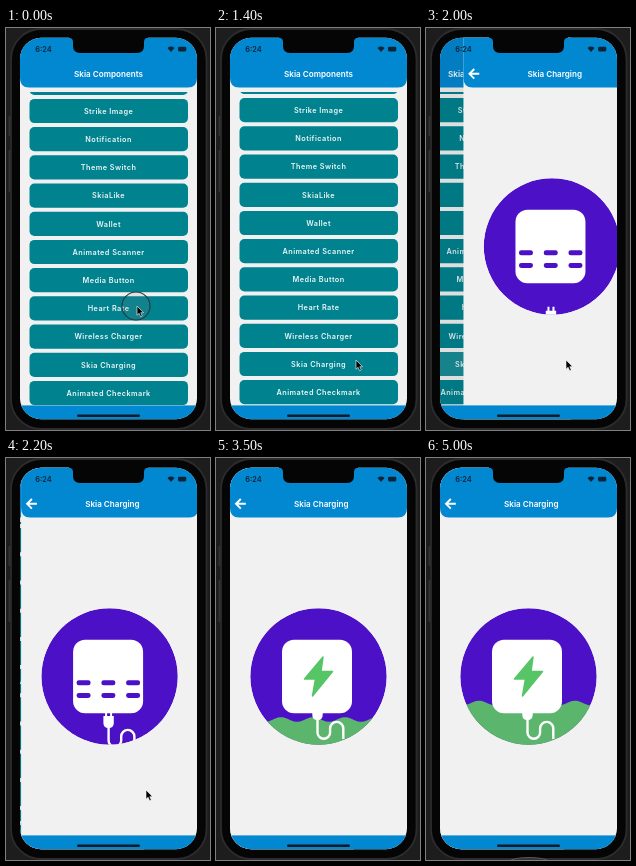
Write an HTML page that moves like this. It is 204 by 402 pixels and loops after 5100 ms.

```html
<!DOCTYPE html>
<html lang="en">
<head>
<meta charset="utf-8">
<title>Charging demo</title>
<style>
  html, body { margin: 0; width: 100%; height: 100%; overflow: hidden; background: #1d1d1e; }
  svg { display: block; width: 204px; height: 402px; }
  text { font-family: Inter, "Open Sans", sans-serif; font-weight: 600; text-anchor: middle; fill: #fff; }
  .title { font-size: 8.1px; }
  .item text { font-size: 7.3px; letter-spacing: .45px; fill: #eef6f6; }
  .item rect { fill: #00838f; }
  .blue { fill: #0288d1; }
  .page { fill: #f1f1f1; }
  .purple { fill: #4c10c6; }
</style>
</head>
<body>
<svg viewBox="0 0 204 402">
  <defs>
    <clipPath id="screen"><rect x="14" y="9.8" width="177" height="381.4" rx="21"/></clipPath>
    <clipPath id="body"><rect x="14" y="64" width="177" height="313.5"/></clipPath>
    <clipPath id="disc"><circle cx="102.5" cy="218.5" r="68.2"/></clipPath>
    <path id="bar" class="blue" d="M14 0H191V50Q191 59.5 182 59.5H23Q14 59.5 14 50Z"/>
  </defs>

  <!-- phone body -->
  <rect x="2.5" y="88" width="3" height="20" rx="1" fill="#333"/>
  <rect x="2.5" y="122" width="3" height="42" rx="1" fill="#333"/>
  <rect x="5" y="1" width="195.5" height="400" rx="30" fill="#050505" stroke="#2c2c2e" stroke-width="1.8"/>

  <g clip-path="url(#screen)">
    <g id="listPage">
      <rect class="page" x="14" width="177" height="402"/>
      <g clip-path="url(#body)"><g id="list"></g></g>
      <use href="#bar"/>
      <text class="title" x="102.5" y="48.8">Skia Components</text>
    </g>
    <rect id="dim" width="204" height="402"/>

    <g id="chargePage">
      <rect class="page" x="14" width="177" height="402"/>
      <use href="#bar"/>
      <path d="M29.8 45.8H20.3M24.8 41L20 45.8L24.8 50.6" fill="none" stroke="#fff" stroke-width="1.9"/>
      <text class="title" x="105.3" y="48.8">Skia Charging</text>
      <g clip-path="url(#disc)">
        <circle class="purple" cx="102.5" cy="218.5" r="68.2"/>
        <path id="wave" fill="#5cb56d"/>
        <g id="cable" fill="#fff">
          <path d="M98 246h2v5h-2zM103 246h2v5h-2zM96.3 250H106.7V257Q106.7 262 101.5 262Q96.3 262 96.3 257Z"/>
          <path d="M101.5 260V274.5a6.3 6.3 0 0 0 12.6 0V270.5a6.6 6.6 0 0 1 13.2 0V281"
                fill="none" stroke="#fff" stroke-width="2.4"/>
        </g>
        <rect x="66" y="181.7" width="70" height="73.5" rx="12" fill="#fff"/>
        <g id="dashes" class="purple"></g>
        <path id="bolt" d="M107 199L88.5 221H99.5L96.5 238L116.5 213.5H105Z"
              fill="#55c566" stroke="#55c566" stroke-width="1.5" stroke-linejoin="round"/>
      </g>
    </g>
    <rect class="blue" x="14" y="377.4" width="177" height="20"/>
  </g>

  <!-- status bar, notch, home indicator -->
  <path d="M63 8V9.8Q67 10 67 14V18Q67 25 74 25H131Q138 25 138 18V14Q138 10 142 9.8V8Z" fill="#050505"/>
  <text x="37.5" y="24.3" font-size="7.4" style="fill:#0b2436">6:24</text>
  <path d="M161.5 20Q165 17.2 168.5 20L165 24Z" fill="#0b2436"/>
  <rect x="172" y="18.8" width="8.3" height="4.6" rx="1.3" fill="#0b2436"/>
  <rect x="71" y="386.5" width="63" height="2.4" rx="1.2" fill="#0a1a26"/>

  <ellipse id="dock" cx="103" cy="404" rx="20" ry="4.5" fill="#333" stroke="#555"/>
  <circle id="touch" r="14" fill="#8882" stroke="#263c40" stroke-width="1.2"/>
  <path id="cursor" d="M0 0V9.2L2.1 7.3L3.7 10.8L5.3 10L3.8 6.7H6.6Z" fill="#000" stroke="#fff" stroke-width=".6"/>
</svg>

<script>
const $ = id => document.getElementById(id);
const clamp = x => Math.max(0, Math.min(1, x));
const ramp = (t, a, b) => clamp((t - a) / (b - a));
const shift = (id, x, y) => $(id).setAttribute('transform', `translate(${x} ${y})`);
const show = (id, on) => $(id).style.opacity = +on;

const LOOP = 5100, STEP = 100, WIDTH = 177;
const items = ['', 'Strike Image', 'Notification', 'Theme Switch', 'SkiaLike', 'Wallet', 'Animated Scanner',
  'Media Button', 'Heart Rate', 'Wireless Charger', 'Skia Charging', 'Animated Checkmark'];

$('list').innerHTML = items.map((name, i) => {
  const y = 54.1 + 28.2 * i;
  return `<g class="item"><rect x="23.5" y="${y - 12.2}" width="158.5" height="24.2" rx="5"/>
    <text x="102.6" y="${y + 2.7}">${name}</text></g>`;
}).join('');
const pressed = $('list').children[10];

$('dashes').innerHTML = [222.2, 234.9].map(y => [69.5, 94.3, 119].map(x =>
  `<rect x="${x}" y="${y}" width="14" height="5" rx="2.3"/>`).join('')).join('');

// time, x, y of the pointer tip
const track = [[0, 131, 278], [600, 131, 278], [1300, 140, 332], [2300, 140, 332], [2600, 181, 302], [2900, 187, 318]];

function pointer(t) {
  const i = track.findIndex(p => p[0] > t);
  const [a, b] = [track[i - 1], track[i]];
  const k = ramp(t, a[0], b[0]), e = k * k * (3 - 2 * k);
  return [a[1] + (b[1] - a[1]) * e, a[2] + (b[2] - a[2]) * e];
}

// fraction of the push still to go, as a critically damped spring
function pushLeft(t) {
  const s = Math.max(0, t - 1807) / 1000 * 18.3;
  return (1 + s) * Math.exp(-s);
}

function drawWave(t) {
  const level = 261.5 - (t - 3500) * 0.0236;
  const crest = 65 + (t - 3500) * 0.0286;
  let d = 'M30 300';
  for (let x = 30; x <= 175; x += 2) {
    d += `L${x} ${level - 2.3 * Math.cos((x - crest) / 32 * 2 * Math.PI)}`;
  }
  $('wave').setAttribute('d', d + 'V300Z');
  show('wave', t > 2600);
}

function draw(t) {
  shift('list', 0, 0.8 * (1 - ramp(t, 0, 400)));
  pressed.style.opacity = t >= 1700 ? 0.9 : 1;

  const left = t < 2300 ? pushLeft(t) : 0;
  shift('listPage', -0.3 * WIDTH * (1 - left), 0);
  shift('chargePage', WIDTH * left, 0);
  show('dim', 0.09 * (1 - left));

  shift('cable', 0, 45 * (1 - ramp(t, 1900, 2265)));
  show('dashes', 1 - ramp(t, 2250, 2450));
  shift('bolt', 0, 28 * (1 - ramp(t, 2300, 2720)));
  show('bolt', ramp(t, 2300, 2550));

  // the picture rests between 4000 and 4900
  drawWave(t <= 4000 ? t : Math.max(4000, t - 800));

  const visible = t < 2900;
  show('cursor', visible);
  show('touch', t < 200);
  show('dock', t >= 4900);
  if (visible) {
    const [x, y] = pointer(t);
    shift('cursor', x, y);
    shift('touch', x - 1, y);
  }
}

function frame(now) {
  draw(Math.floor(now % LOOP / STEP) * STEP);
  requestAnimationFrame(frame);
}
draw(0);
requestAnimationFrame(frame);
</script>
</body>
</html>
```
